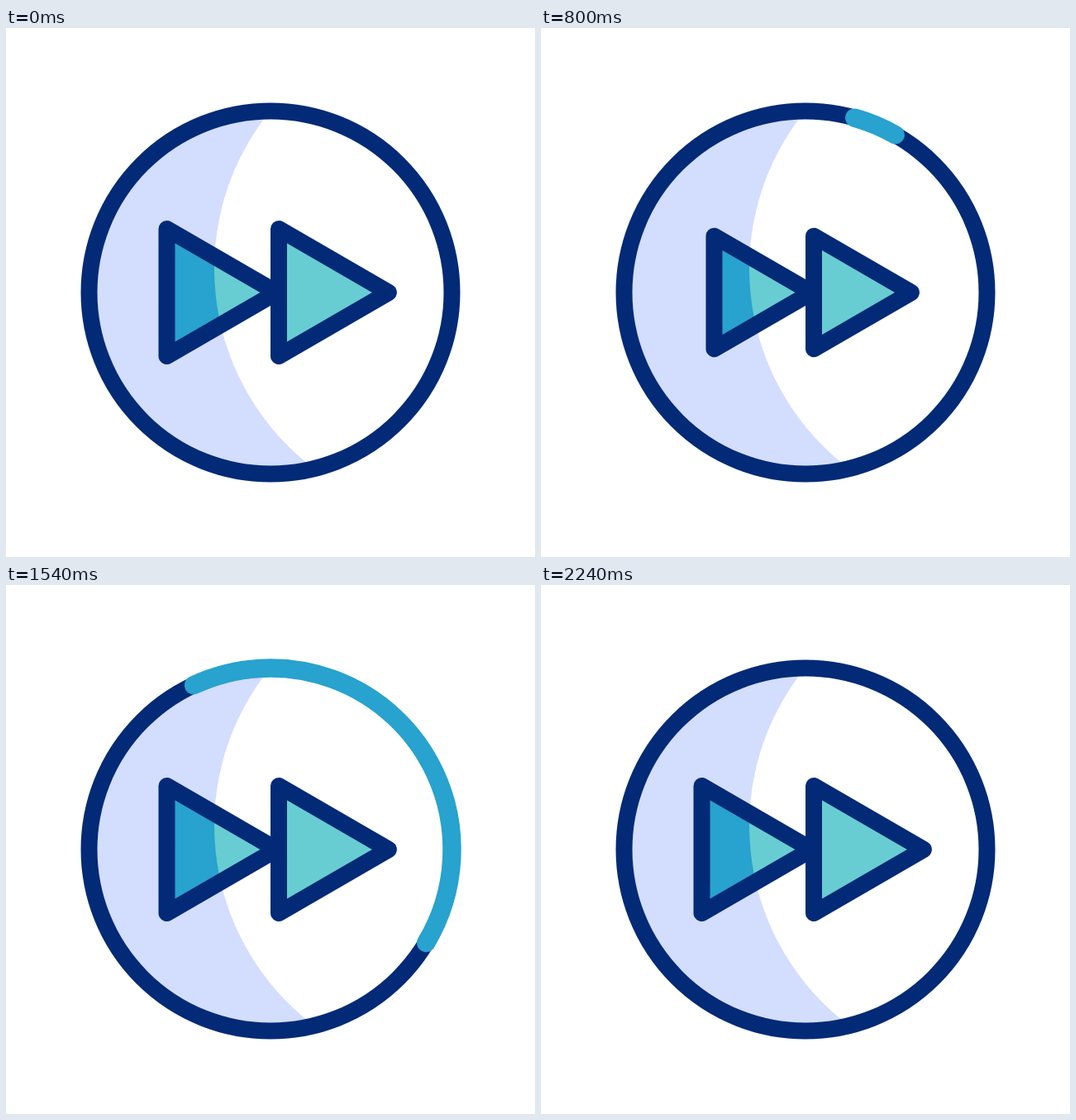
An HTML page with a canvas for the animation above (2.72 s loop, 640x640 px).

```html
<!DOCTYPE html>
<html>
<head>
<meta charset="utf-8">
<style>
  html, body { margin: 0; width: 100%; height: 100%; overflow: hidden; background: #fff; }
  canvas { display: block; width: 640px; height: 640px; }
</style>
</head>
<body>
<canvas id="stage" width="640" height="640"></canvas>
<script>
const ctx = document.getElementById('stage').getContext('2d');
const LOOP = 2720, CENTER = 320, RADIUS = 219.5;
const SWEEP_START = 600, SWEEP_END = 2240, HEAD_TIME = 1545, TWO_LAPS = 4 * Math.PI;
const NAVY = '#032a76', BLUE = '#28a2ce', AQUA = '#67cdd2', LAVENDER = '#d3ddfe';

const clamp = u => Math.min(1, Math.max(0, u));
const easeInOut = u => (1 - Math.cos(Math.PI * clamp(u))) / 2;
// Starts as a steady acceleration and brakes late.
const easeLate = u => u * u * (1.45 - 0.45 * u ** 4.5);

// The arrows swell, shrink and swell again, then settle.
function arrowScale(t) {
  const poses = [[0, 1], [220, 1.109], [640, .7], [980, 1.109], [1180, .96], [1440, 1]];
  const next = poses.findIndex(([time]) => time > t);
  if (next < 0) return 1;
  const [t0, from] = poses[next - 1], [t1, to] = poses[next];
  return from + (to - from) * easeInOut((t - t0) / (t1 - t0));
}

function disc(x, y, r) {
  const path = new Path2D();
  path.arc(x, y, r, 0, 2 * Math.PI);
  return path;
}

function triangle(baseX, tipX, scale) {
  const path = new Path2D();
  path.moveTo(baseX, CENTER - 77 * scale);
  path.lineTo(tipX, CENTER);
  path.lineTo(baseX, CENTER + 77 * scale);
  path.closePath();
  return path;
}

const button = disc(CENTER, CENTER, RADIUS);
const shade = new Path2D('M0 0H640V640H0Z');
shade.addPath(disc(555, 291, 303));

function fillShaded(path, color) {
  ctx.save();
  ctx.clip(shade, 'evenodd');
  ctx.fillStyle = color;
  ctx.fill(path);
  ctx.restore();
}

function outline(path, color, width) {
  ctx.strokeStyle = color;
  ctx.lineWidth = width;
  ctx.stroke(path);
}

function drawArrow(path) {
  ctx.fillStyle = AQUA;
  ctx.fill(path);
  fillShaded(path, BLUE);
  outline(path, NAVY, 20);
}

function drawSweep(t) {
  if (t <= SWEEP_START || t >= SWEEP_END) return;
  const elapsed = t - SWEEP_START, top = -Math.PI / 2;
  const tail = TWO_LAPS * easeLate(elapsed / (SWEEP_END - SWEEP_START));
  const head = TWO_LAPS * easeInOut(elapsed / HEAD_TIME);
  const path = new Path2D();
  path.arc(CENTER, CENTER, RADIUS, top + tail, top + head);
  outline(path, BLUE, 22.5);
}

function draw(t) {
  ctx.fillStyle = '#fff';
  ctx.fillRect(0, 0, 640, 640);
  fillShaded(button, LAVENDER);
  const scale = arrowScale(t), length = 133 * scale;
  drawArrow(triangle(327.5 - length, 327.5, scale));
  drawArrow(triangle(330, 330 + length, scale));
  outline(button, NAVY, 20);
  drawSweep(t);
}

ctx.lineCap = ctx.lineJoin = 'round';
function tick() {
  draw(performance.now() % LOOP);
  requestAnimationFrame(tick);
}
tick();
</script>
</body>
</html>
```
